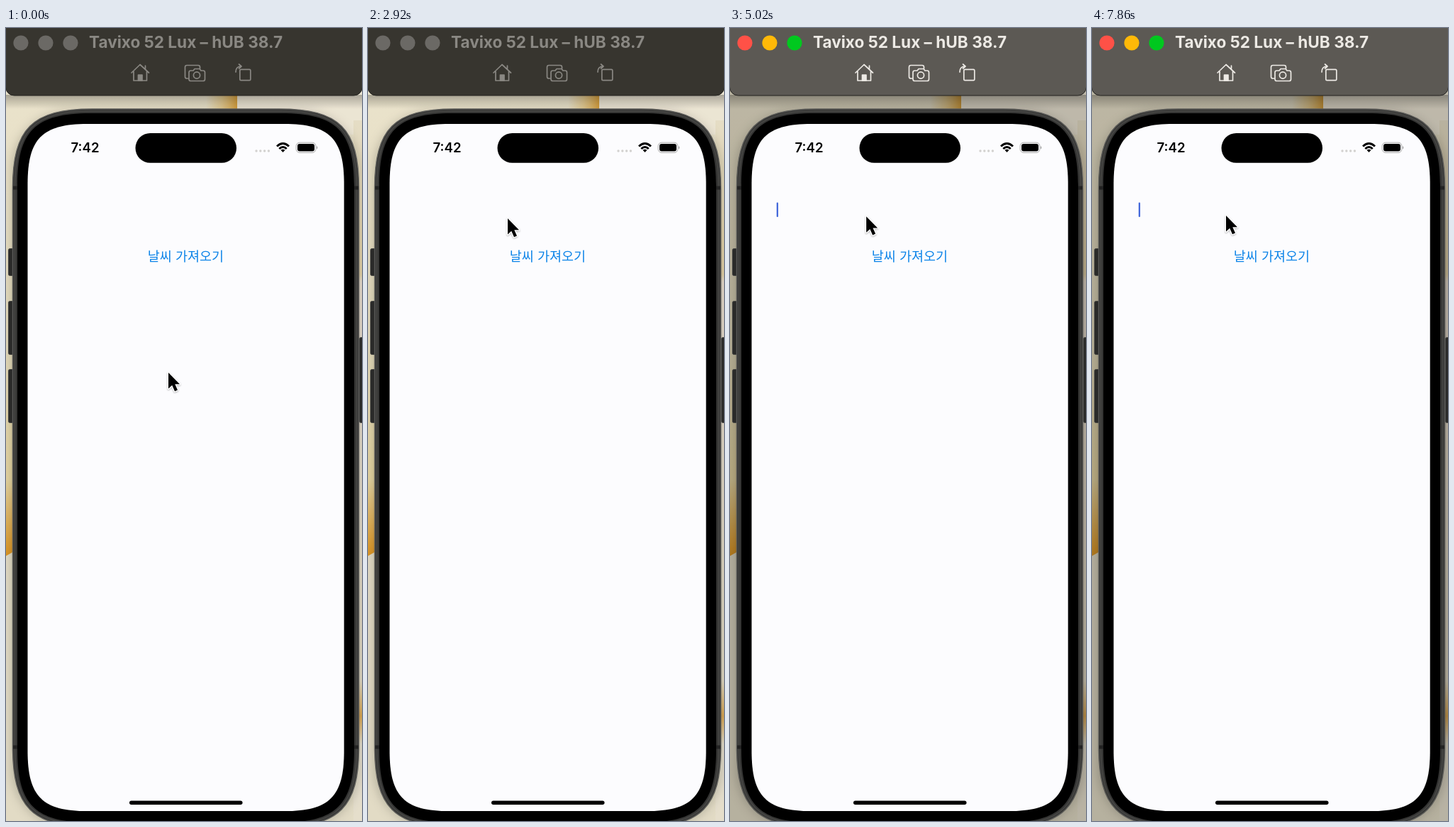
An HTML page for the animation above (8 s loop, 502 px wide and 1116 px high).

```html
<!DOCTYPE html>
<html lang="ko">
<head>
<meta charset="utf-8">
<style>
html, body { margin: 0; width: 100%; height: 100%; overflow: hidden; }
svg { display: block; --bar: #37352f; --ink: #8a8883; --red: #6b6965; --amber: #6b6965; --green: #6b6965; --shade: .03; }
svg.active { --bar: #5c5954; --ink: #edeae5; --red: #ff5147; --amber: #ffb908; --green: #00c81f; --shade: .22; }
.title { font: 700 22.6px Inter, sans-serif; fill: var(--ink); }
.icon { fill: none; stroke: var(--ink); stroke-width: 1.7; stroke-linejoin: round; stroke-linecap: round; }
.clock { font: 600 18.6px Inter, sans-serif; }
.link { font: 400 18.5px "Noto Sans CJK KR", "Noto Sans CJK", sans-serif; fill: #0d84e8; text-anchor: middle; }
</style>
</head>
<body>
<svg id="stage" width="502" height="1116" viewBox="0 0 502 1116">
  <defs>
    <linearGradient id="cream" x2="0" y2="1">
      <stop offset="0" stop-color="#f3ecd6"/><stop offset=".4" stop-color="#e9e0c0"/>
      <stop offset=".57" stop-color="#ead9a4"/><stop offset=".665" stop-color="#e39a24"/>
    </linearGradient>
    <linearGradient id="gold">
      <stop offset="0" stop-color="#e8c67c" stop-opacity="0"/><stop offset=".5" stop-color="#e8c67c" stop-opacity=".7"/>
      <stop offset="1" stop-color="#dba23c"/>
    </linearGradient>
    <linearGradient id="barShadow" x2="0" y2="1">
      <stop offset="0" stop-opacity=".28"/><stop offset="1" stop-opacity="0"/>
    </linearGradient>
    <linearGradient id="side" x2="0" y2="1">
      <stop offset="0" stop-color="#ece4cb"/><stop offset=".22" stop-color="#ecd9ac"/>
      <stop offset=".23" stop-color="#f0e4d4"/><stop offset=".8" stop-color="#e9e1ca"/>
      <stop offset=".85" stop-color="#e2ad55"/><stop offset=".89" stop-color="#ece5d2"/>
    </linearGradient>
    <filter id="soft" x="-20%" y="-20%" width="140%" height="140%"><feGaussianBlur stdDeviation="8"/></filter>
    <filter id="drop" x="-50%" y="-50%" width="200%" height="200%">
      <feDropShadow dx="0" dy="1" stdDeviation="1.2" flood-opacity=".35"/>
    </filter>
  </defs>

  <g id="wallpaper">
    <rect width="502" height="1116" fill="url(#cream)"/>
    <path d="M0 743 L14 735 H502 V1116 H0Z" fill="#e9e2cb"/>
    <rect x="282" y="90" width="44" height="60" fill="url(#gold)"/>
    <rect x="326" y="90" width="176" height="60" fill="#f3ecda"/>
    <rect x="490" y="130" width="12" height="986" fill="url(#side)"/>
    <rect x="9" y="118" width="489" height="1006" rx="82" fill-opacity=".22" filter="url(#soft)"/>
    <rect y="94" width="502" height="20" fill="url(#barShadow)"/>
    <rect width="502" height="1116" style="fill-opacity:var(--shade)"/>
  </g>

  <g id="toolbar">
    <rect x="-.5" y="-20" width="503" height="115" rx="12" style="fill:var(--bar)" stroke="#22211f"/>
    <circle cx="21" cy="21" r="10.6" style="fill:var(--red)"/>
    <circle cx="56" cy="21" r="10.6" style="fill:var(--amber)"/>
    <circle cx="91" cy="21" r="10.6" style="fill:var(--green)"/>
    <text class="title" x="117" y="27.800">Tavixo 52 Lux – hUB 38.7</text>
    <g class="icon">
      <path d="M177 63 L189 51.5 L201.500 63 M180 61 V74 H198.500 V61 M196.500 57 V53"/>
      <path d="M186.500 74 V66 H192 V74Z" style="fill:var(--ink)"/>
      <path d="M257 71 H255 Q252.500 71 252.500 68.500 V55 Q252.500 52.500 255 52.500 H271 Q273.500 52.500 273.500 55 V57"/>
      <path d="M260.500 60 H264 L266 57.500 H273 L275 60 H278 Q280.500 60 280.500 62.500 V72 Q280.500 74.500 278 74.500 H260.500 Q258 74.500 258 72 V62.500 Q258 60 260.500 60Z"/>
      <circle cx="269" cy="66.500" r="4.600"/>
      <rect x="329.800" y="58.300" width="15" height="15.400" rx="1.500"/>
      <path d="M324 62 Q324 54 331.500 54 M328.500 51 L332 54 L328.500 57"/>
    </g>
  </g>

  <g id="phone">
    <g fill="#2a2a29" stroke="#454542">
      <rect x="3.500" y="310.500" width="9" height="38" rx="2"/>
      <rect x="3.500" y="384.500" width="9" height="75" rx="2"/>
      <rect x="3.500" y="480.500" width="9" height="75" rx="2"/>
      <rect x="498.500" y="435.500" width="6" height="120" rx="2"/>
    </g>
    <path id="frame" fill="#343433" stroke="#5a5a57" stroke-width="1.500"/>
    <path id="rim" fill="none" stroke="#454543" stroke-width="2"/>
    <path d="M10 225h7M10 1012h7M490 225h7M490 1012h7" stroke="#222" stroke-width="5"/>
    <path id="bezel"/>
    <path id="screen" fill="#fcfcfe"/>
    <rect x="182.500" y="148" width="142.500" height="41.800" rx="20.900"/>
    <text class="clock" x="91.500" y="175">7:42</text>
    <g fill="#d2d1cf">
      <circle cx="353" cy="173" r="1.700"/><circle cx="358.800" cy="173" r="1.700"/>
      <circle cx="364.600" cy="173" r="1.700"/><circle cx="370.400" cy="173" r="1.700"/>
    </g>
    <g fill="none" stroke="#000" stroke-width="2.900">
      <path d="M382 166.500 Q390.500 158.500 399 166.500 M385.300 170 Q390.500 165 395.700 170"/>
      <path d="M387.500 171.800 Q390.500 169.500 393.500 171.800 L390.500 175Z" fill="#000" stroke="none"/>
    </g>
    <rect x="409.200" y="161.200" width="27.600" height="14.200" rx="4.800" fill="none" stroke="#aaa"/>
    <rect x="411" y="163" width="24" height="10.600" rx="3"/>
    <path d="M438 166 Q440.500 168.300 438 170.600Z" fill="#999"/>
    <rect x="174" y="1087.500" width="159.500" height="5.500" rx="2.750"/>
    <text class="link" x="253.500" y="328">날씨 가져오기</text>
    <rect id="caret" x="65.700" y="245.500" width="2.300" height="20.500" rx="1" fill="#456adb"/>
  </g>

  <path id="cursor" d="M0 0 V22.500 L5.200 17.800 L9 26.200 L13 24.400 L9.300 16.200 H16Z"
        stroke="#fff" stroke-width="2.400" paint-order="stroke" stroke-linejoin="round" filter="url(#drop)"/>
</svg>
<script>
const LOOP = 8000, ACTIVATE = 2980, CARET_SHOWN = 3020;
const $ = id => document.getElementById(id);
const stage = $('stage'), caret = $('caret'), cursor = $('cursor');

// Rounded box with continuous-curvature corners
function squircle(id, x, y, w, h, r) {
  const a = 1.35 * r, c = .33 * r, s = a - c;
  $(id).setAttribute('d', `M${x + a} ${y} h${w - 2 * a} c${s} 0 ${a} ${c} ${a} ${a}
    v${h - 2 * a} c0 ${s} ${-c} ${a} ${-a} ${a} h${2 * a - w} c${-s} 0 ${-a} ${-c} ${-a} ${-a}
    v${2 * a - h} c0 ${-s} ${c} ${-a} ${a} ${-a}Z`);
}
squircle('frame', 9.5, 114, 488, 1010, 83);
squircle('rim', 12.5, 117, 482, 1004, 80);
squircle('bezel', 16, 120, 475, 998, 76);
squircle('screen', 30.5, 135, 446.2, 967, 62.5);

// [time, x, y] of the pointer tip
const path = [
  [120, 229, 485], [820, 201, 348], [960, 201, 347], [1700, 196, 288], [1820, 196, 287],
  [2240, 197, 276], [2400, 197, 275], [2540, 196, 283], [2680, 197, 271], [2800, 197, 271],
  [2920, 197, 268], [3100, 197, 267], [4600, 197, 267], [5340, 189, 264]
];
const blinks = [3240, 4320, 5840, 6840, 7840];

function pointerAt(t) {
  const next = path.findIndex(key => key[0] > t);
  if (next === 0) return path[0].slice(1);
  if (next < 0) return path[path.length - 1].slice(1);
  const [t0, x0, y0] = path[next - 1], [t1, x1, y1] = path[next];
  const p = (t - t0) / (t1 - t0), e = p * p * (3 - 2 * p);
  return [x0 + (x1 - x0) * e, y0 + (y1 - y0) * e];
}

function caretAt(t) {
  if (t < CARET_SHOWN) return 0;
  const since = t - blinks.filter(start => start <= t).pop();
  if (since >= 180 && since < 300) return 0;
  return since >= 300 && since < 420 ? .5 : 1;
}

function draw() {
  const t = performance.now() % LOOP;
  stage.classList.toggle('active', t >= ACTIVATE);
  caret.setAttribute('opacity', caretAt(t));
  cursor.setAttribute('transform', `translate(${pointerAt(t)})`);
  requestAnimationFrame(draw);
}
draw();
</script>
</body>
</html>
```
